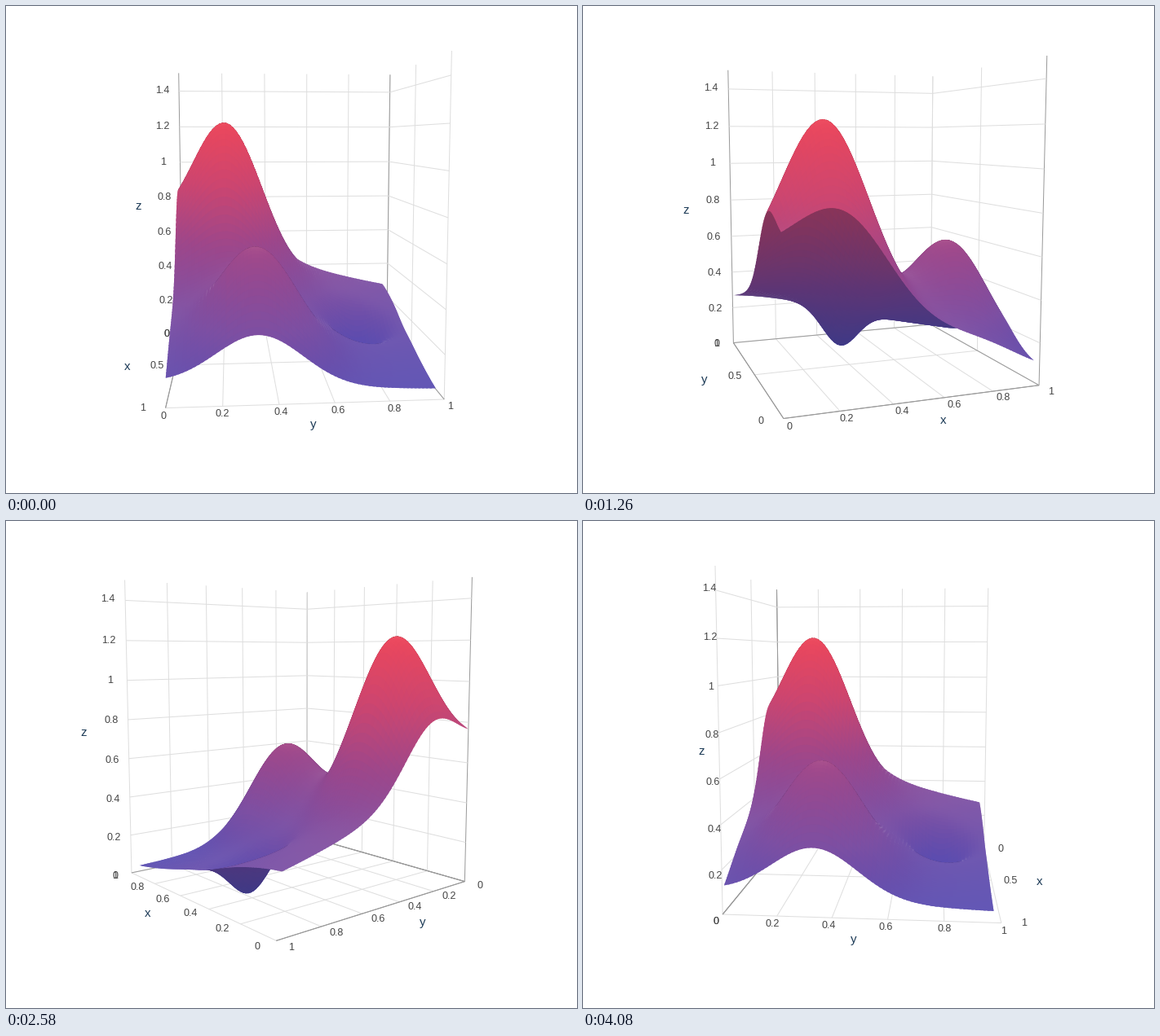
Recreate the animation shown at these times as a matplotlib script. Size 700 by 598 pixels, loop 4.14 s.

```python
import numpy as np
import matplotlib.pyplot as plt
from matplotlib.animation import FuncAnimation
from matplotlib.collections import LineCollection, PolyCollection

W, H, DPI = 700, 598, 100
PX = 72 / DPI
STEP = 5  # degrees of orbit per turn
TURNS = [k for k in range(1, 72) if k not in (54, 68)]

# Camera
CX, CY = 354.2, 257.8
FOCAL, DIST = 920, 3.11
TILT = np.radians(6)
Z_TOP, Z_SCALE = 1.5, 0.83

GRID, ZERO = '#dedede', '#9a9a9a'
TICK_GAP, TITLE_GAP = 0.078, 0.198

plt.rcParams['font.family'] = 'Liberation Sans'


def franke(x, y):
    a, b = 9 * x, 9 * y
    return (0.75 * np.exp(-((a - 2) ** 2 + (b - 2) ** 2) / 4)
            + 0.75 * np.exp(-(a + 1) ** 2 / 49 - (b + 1) / 10)
            + 0.5 * np.exp(-((a - 7) ** 2 + (b - 3) ** 2) / 4)
            - 0.2 * np.exp(-(a - 4) ** 2 - (b - 7) ** 2))


def ramp(z, stops, colors):
    colors = np.array(colors) / 255
    return np.stack([np.interp(z, stops, c) for c in colors.T], axis=-1)


def to_world(points):
    return (np.asarray(points, float) - (0.5, 0.5, Z_TOP / 2)) * (1, 1, Z_SCALE)


def project(points, angle):
    """Screen positions of points given in data units."""
    p = to_world(points)
    c, s = np.cos(angle), np.sin(angle)
    right = p[..., 1] * c - p[..., 0] * s
    away = -(p[..., 0] * c + p[..., 1] * s)
    depth = DIST + away * np.cos(TILT) - p[..., 2] * np.sin(TILT)
    up = away * np.sin(TILT) + p[..., 2] * np.cos(TILT)
    return np.stack([CX + FOCAL * right / depth, CY - FOCAL * up / depth], axis=-1)


def patches(xlo, xhi, ylo, yhi):
    """Four surface corners for every cell of the grid."""
    corners = []
    for xs, ys in ((xlo, ylo), (xhi, ylo), (xhi, yhi), (xlo, yhi)):
        x, y = np.meshgrid(xs, ys, indexing='ij')
        corners.append(np.stack([x, y, franke(x, y)], axis=-1).reshape(-1, 3))
    return np.stack(corners, axis=1)


# Surface cells and their two-sided colours
side = np.linspace(0, 0.975, 70)
lo, hi = side[:-1], side[1:]
LAP = 0.6 * side[1]
cells = patches(lo, hi, lo, hi)
mid = cells.mean(axis=1)
world = to_world(cells)
normal = np.cross(world[:, 2] - world[:, 0], world[:, 3] - world[:, 1])
flat = normal[:, 2:] / np.linalg.norm(normal, axis=1, keepdims=True)
lit = ramp(mid[:, 2], [0, 0.3, 0.6, 0.9, 1.22],
           [(82, 74, 178), (124, 78, 162), (157, 70, 138), (205, 69, 111), (237, 70, 90)])
lit += (1 - lit) * 0.07 * flat ** 4
shade = ramp(mid[:, 2], [0, 0.4, 0.75, 1.22],
             [(62, 57, 134), (94, 53, 116), (131, 52, 92), (172, 52, 68)])

fig = plt.figure(figsize=(W / DPI, H / DPI), dpi=DPI, facecolor='white')
ax = fig.add_axes([0, 0, 1, 1])
ax.set_xlim(0, W)
ax.set_ylim(H, 0)
ax.axis('off')

lines = LineCollection([], linewidths=PX, zorder=1)
surface = PolyCollection([], linewidths=0, edgecolors='none', zorder=3)
ax.add_collection(lines, autolim=False)
ax.add_collection(surface, autolim=False)
labels = [ax.text(0, 0, '', ha='center', va='center', zorder=2) for _ in range(26)]

Z_TICKS = np.arange(8) * 0.2


def ticks_for(start, end, angle):
    """Coarser ticks when the edge looks short on screen."""
    a, b = project([start, end], angle)
    return np.linspace(0, 1, 3 if np.hypot(*(b - a)) < 112 else 6)


def frame_lines(wx, wy, xt, yt):
    segs, colors = [], []

    def add(value, a, b):
        segs.append((a, b))
        colors.append(ZERO if value == 0 else GRID)

    for y in yt:
        add(y, (wx, y, 0), (wx, y, Z_TOP))
        add(y, (0, y, 0), (1, y, 0))
    for x in xt:
        add(x, (x, wy, 0), (x, wy, Z_TOP))
        add(x, (x, 0, 0), (x, 1, 0))
    for z in Z_TICKS[::-1]:
        add(z, (wx, 0, z), (wx, 1, z))
        add(z, (0, wy, z), (1, wy, z))
    # dark lines stay above the grid on the floor
    for a, b in (((0, 0, 0), (0, 1, 0)), ((0, 0, 0), (1, 0, 0))):
        add(0, a, b)
    return np.array(segs, float), colors


def lapped(eye):
    """Cell bounds stretched towards the eye, so nearer cells hide the seams."""
    centre = (lo + hi) / 2
    return (np.where(eye < centre, np.maximum(lo - LAP, 0), lo),
            np.where(eye > centre, np.minimum(hi + LAP, side[-1]), hi))


def draw_surface(angle):
    eye = DIST * np.array([np.cos(angle) * np.cos(TILT),
                           np.sin(angle) * np.cos(TILT), np.sin(TILT)])
    ray = eye - to_world(mid)
    above = (normal * ray).sum(axis=1, keepdims=True) > 0
    order = np.argsort(-np.hypot(ray[:, 0], ray[:, 1]))
    shape = patches(*lapped(eye[0] + 0.5), *lapped(eye[1] + 0.5))
    surface.set_verts(project(shape, angle)[order])
    surface.set_facecolor(np.where(above, lit, shade)[order])


def draw(i):
    angle = -np.radians(STEP * TURNS[i])
    wx, wy = int(np.cos(angle) <= 0), int(np.sin(angle) <= 0)  # far walls
    nx, ny = 1 - wx, 1 - wy                                    # near edges
    ox, oy = 2 * nx - 1, 2 * ny - 1                            # outward signs

    xt = ticks_for((0, ny, 0), (1, ny, 0), angle)
    yt = ticks_for((nx, 0, 0), (nx, 1, 0), angle)

    segs, colors = frame_lines(wx, wy, xt, yt)
    lines.set_segments(project(segs, angle))
    lines.set_color(colors)

    # z labels hang off the leftmost outer corner
    ends = project([(wx, ny, 0), (nx, wy, 0)], angle)
    on_x_wall = ends[0, 0] < ends[1, 0]

    def x_spot(v, gap):
        return v, ny + oy * gap, 0

    def y_spot(v, gap):
        return nx + ox * gap, v, 0

    def z_spot(v, gap):
        return (wx, ny + oy * gap, v) if on_x_wall else (nx + ox * gap, wy, v)

    items = []
    for name, spot, ticks, top in (('x', x_spot, xt, 1), ('y', y_spot, yt, 1),
                                   ('z', z_spot, Z_TICKS, Z_TOP)):
        items += [(f'{v:.1f}'.replace('.0', ''), spot(v, TICK_GAP), 12.5, '#444444')
                  for v in ticks]
        items.append((name, spot(top / 2, TITLE_GAP), 15, '#1c3a56'))

    for t in labels:
        t.set_text('')
    spots = project([item[1] for item in items], angle)
    for t, (text, _, size, color), pos in zip(labels, items, spots):
        t.set_text(text)
        t.set_position(pos)
        t.set_fontsize(size * PX)
        t.set_color(color)

    draw_surface(angle)
    return [lines, surface, *labels]


anim = FuncAnimation(fig, draw, frames=len(TURNS), interval=60,
                     repeat=True, repeat_delay=0, blit=False)
plt.show()
```
